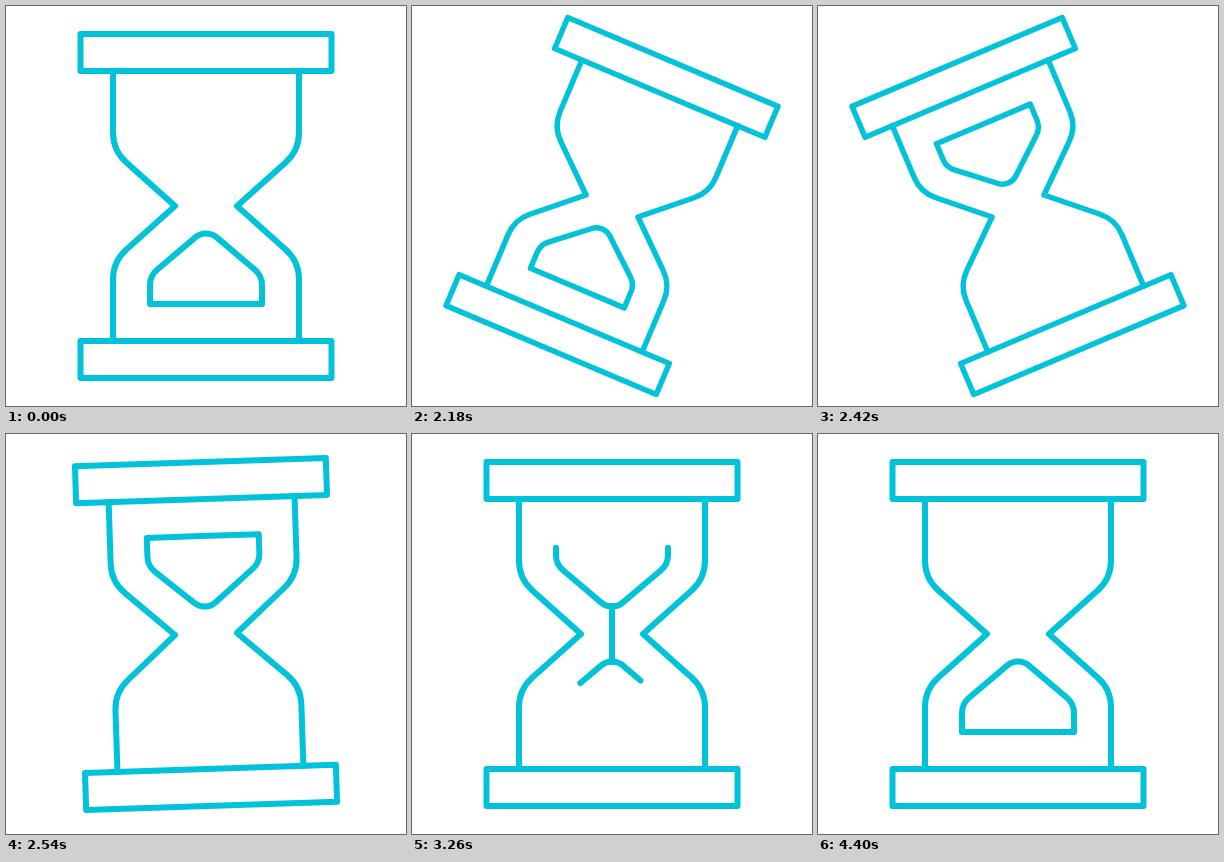
An HTML page that plays this animation: 400 px wide and 400 px high, repeating every 4.43 s.

```html
<!DOCTYPE html>
<html lang="en">
<head>
<meta charset="utf-8">
<title>Hourglass</title>
<style>
  html, body { margin: 0; height: 100%; overflow: hidden; background: #fff; }
  svg { display: block; width: 100%; height: 100%; }
  g { fill: none; stroke: #00c3d9; stroke-width: 6; stroke-linecap: round; stroke-linejoin: round; }
</style>
</head>
<body>
<svg viewBox="0 0 400 400">
  <g id="hourglass">
    <path d="M74.5 28H325.5V65H74.5ZM74.5 335H325.5V372H74.5Z"/>
    <path id="side" d="M107 65V126.5A40 40 0 0 0 120.4 156.5L169 200L120.4 243.5A40 40 0 0 0 107 273.5V335"/>
    <use href="#side" transform="matrix(-1 0 0 1 400 0)"/>
    <path id="lower" pathLength="2"/>
    <path id="upper" pathLength="2" transform="rotate(180 200 200)"/>
    <path id="stream"/>
  </g>
</svg>
<script>
const LOOP = 4430, STEP = 30;
const TURN = 2000, POUR = 2600, LAND = 2900, EMPTY = 4100, FULL = 4400;
const [hourglass, lower, upper, stream] =
  ['hourglass', 'lower', 'upper', 'stream'].map(id => document.getElementById(id));

// Sand outline, clockwise from a point on its flat side
const sand = x => `M${x} 298H144V279.1A20 20 0 0 1 151.1 263.8L189.3 231.4
  A16.5 16.5 0 0 1 210.7 231.4L248.9 263.8A20 20 0 0 1 256 279.1V298Z`;
lower.setAttribute('d', sand(202));
upper.setAttribute('d', sand(200));

const progress = (t, from, to) => Math.min(1, Math.max(0, (t - from) / (to - from)));

function bezier(x1, y1, x2, y2) {
  const at = (a, b, s) => 3 * a * s * (1 - s) ** 2 + 3 * b * s * s * (1 - s) + s ** 3;
  return x => {
    if (x <= 0 || x >= 1) return x;
    let low = 0, high = 1;
    for (let i = 0; i < 30; i++) {
      const mid = (low + high) / 2;
      if (at(x1, x2, mid) < x) low = mid; else high = mid;
    }
    return at(y1, y2, low);
  };
}
const turnEase = bezier(.6, 0, .4, 1);
const flowEase = bezier(.25, .1, .25, 1);

// Shrink the turning hourglass to stay within 400 by 384
function fit(angle) {
  const c = Math.abs(Math.cos(angle)), s = Math.abs(Math.sin(angle));
  return Math.min(1, 192 / (175 * c + 128.5 * s), 200 / (175 * s + 128.5 * c));
}

const show = (el, on) => el.setAttribute('visibility', on ? 'visible' : 'hidden');

// Keep the part of the outline within `half` of its tip
function trim(el, half) {
  show(el, half > 0);
  el.setAttribute('stroke-dasharray', half < 1 ? `${2 * half} 4` : 'none');
  el.setAttribute('stroke-dashoffset', half - 1);
}

function draw(t) {
  const pouring = t >= POUR;
  const angle = pouring ? 0 : Math.PI * turnEase(progress(t, TURN, POUR));
  hourglass.setAttribute('transform',
    `translate(200 200) rotate(${angle * 180 / Math.PI}) scale(${fit(angle)}) translate(-200 -200)`);

  trim(lower, pouring ? progress(t, LAND, FULL) : 1);
  trim(upper, pouring ? 1 - progress(t, POUR, EMPTY) : 0);

  const flowY = start => 172 + 56 * flowEase(progress(t, start, start + 300));
  show(stream, pouring && t < FULL);
  stream.setAttribute('d', `M200 ${flowY(EMPTY)}V${flowY(POUR)}`);
}

const start = performance.now();
function tick() {
  const t = (performance.now() - start) % LOOP;
  draw(TURN + Math.floor((t - TURN + 2) / STEP) * STEP);
  requestAnimationFrame(tick);
}
tick();
</script>
</body>
</html>
```
